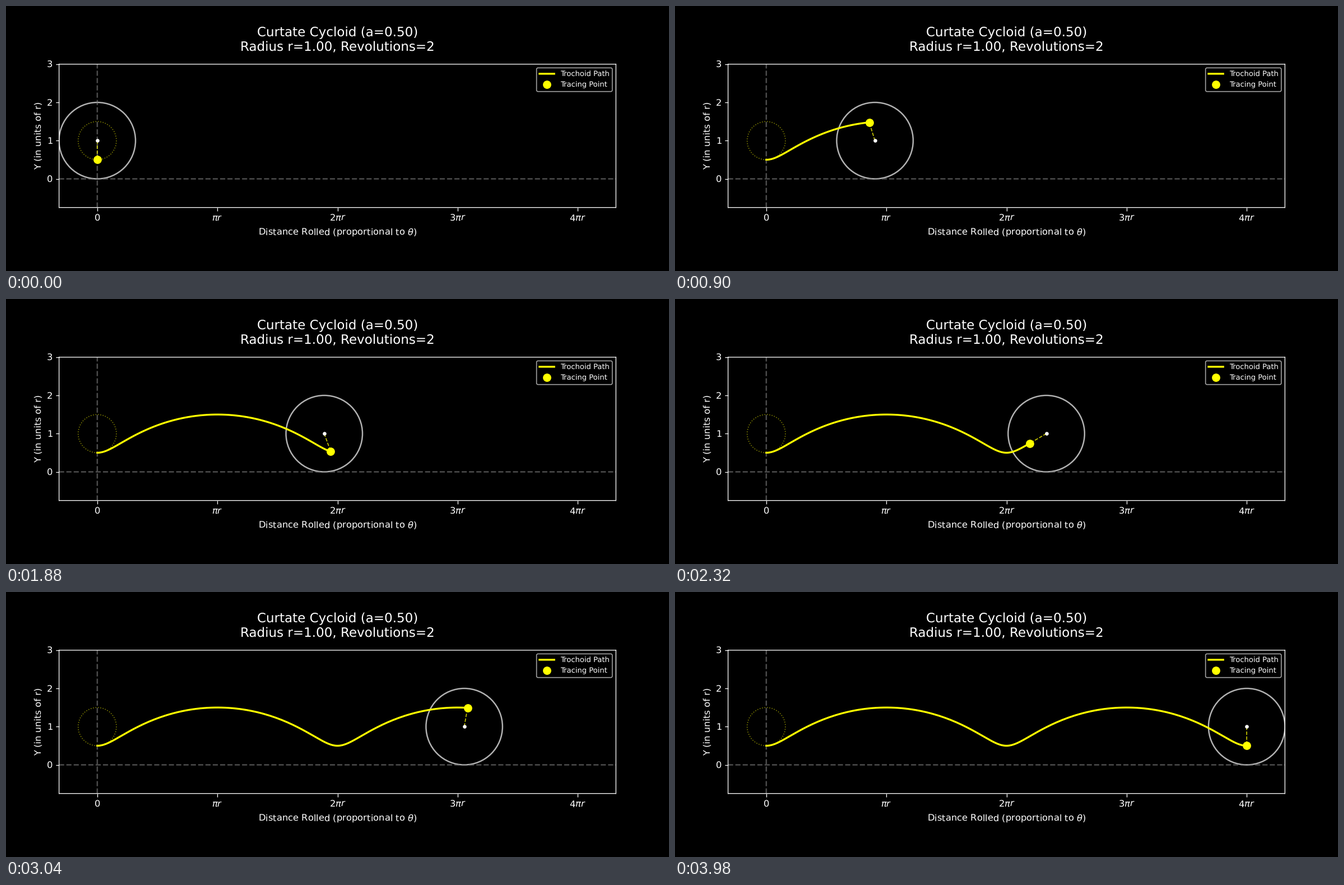
Write a matplotlib script that moves like this. It is 1183 px wide and 473 px high and loops after 4 s.

```python
import numpy as np
import matplotlib.pyplot as plt
from matplotlib.animation import FuncAnimation

RADIUS, ARM, TURNS = 1.0, 0.5, 2
FRAMES, INTERVAL = 200, 20
DPI = 118.3

plt.style.use("dark_background")
plt.rcParams.update({
    "font.family": "DejaVu Sans",
    "path.snap": False,
    "text.hinting": "no_hinting",
})

theta = np.linspace(0, 2 * np.pi * TURNS, FRAMES)
path_x = RADIUS * theta - ARM * np.sin(theta)
path_y = RADIUS - ARM * np.cos(theta)

fig = plt.figure(figsize=(1183 / DPI, 473 / DPI), dpi=DPI)
width = 0.84
x_span = theta[-1] * RADIUS + 2 * RADIUS
height = width * 1183 / x_span * 3.75 / 473
ax = fig.add_axes([0.08, 0.51 - height / 2, width, height])
ax.set_xlim(-RADIUS, theta[-1] * RADIUS + RADIUS)
ax.set_ylim(-0.75, 3)
ax.set_xticks(np.pi * RADIUS * np.arange(2 * TURNS + 1))
ax.set_xticklabels(["0", r"$\pi r$"] + [rf"${k}\pi r$" for k in range(2, 2 * TURNS + 1)])
ax.set_yticks(range(4))
ax.set_xlabel(r"Distance Rolled (proportional to $\theta$)")
ax.set_ylabel("Y (in units of r)")
ax.set_title(
    f"Curtate Cycloid (a={ARM:.2f})\nRadius r={RADIUS:.2f}, Revolutions={TURNS}",
    fontsize=14, pad=14.5,
)

for draw_axis in (ax.axhline, ax.axvline):
    draw_axis(0, color="gray", ls="--", lw=1.5, alpha=0.6)


def add_circle(radius, **style):
    return ax.add_patch(plt.Circle((0, RADIUS), radius, fill=False, **style))


wheel = add_circle(RADIUS, ec="white", lw=1.5, alpha=0.7)
add_circle(ARM, ec="yellow", lw=1, ls=":", alpha=0.5)
path, = ax.plot([], [], color="yellow", lw=2, label="Trochoid Path")
arm, = ax.plot([], [], color="yellow", lw=1, ls="--", alpha=0.8)
hub, = ax.plot([], [], "o", color="white", ms=3)
tracer, = ax.plot([], [], "o", color="yellow", ms=8, label="Tracing Point")
ax.legend(handles=[path, tracer], loc="upper right", fontsize=8)


def update(i):
    center = RADIUS * theta[i]
    wheel.center = center, RADIUS
    hub.set_data([center], [RADIUS])
    arm.set_data([center, path_x[i]], [RADIUS, path_y[i]])
    tracer.set_data([path_x[i]], [path_y[i]])
    path.set_data(path_x[:i + 1], path_y[:i + 1])
    return wheel, path, arm, hub, tracer


anim = FuncAnimation(fig, update, frames=FRAMES, interval=INTERVAL, repeat=True, repeat_delay=0)
plt.show()
```
